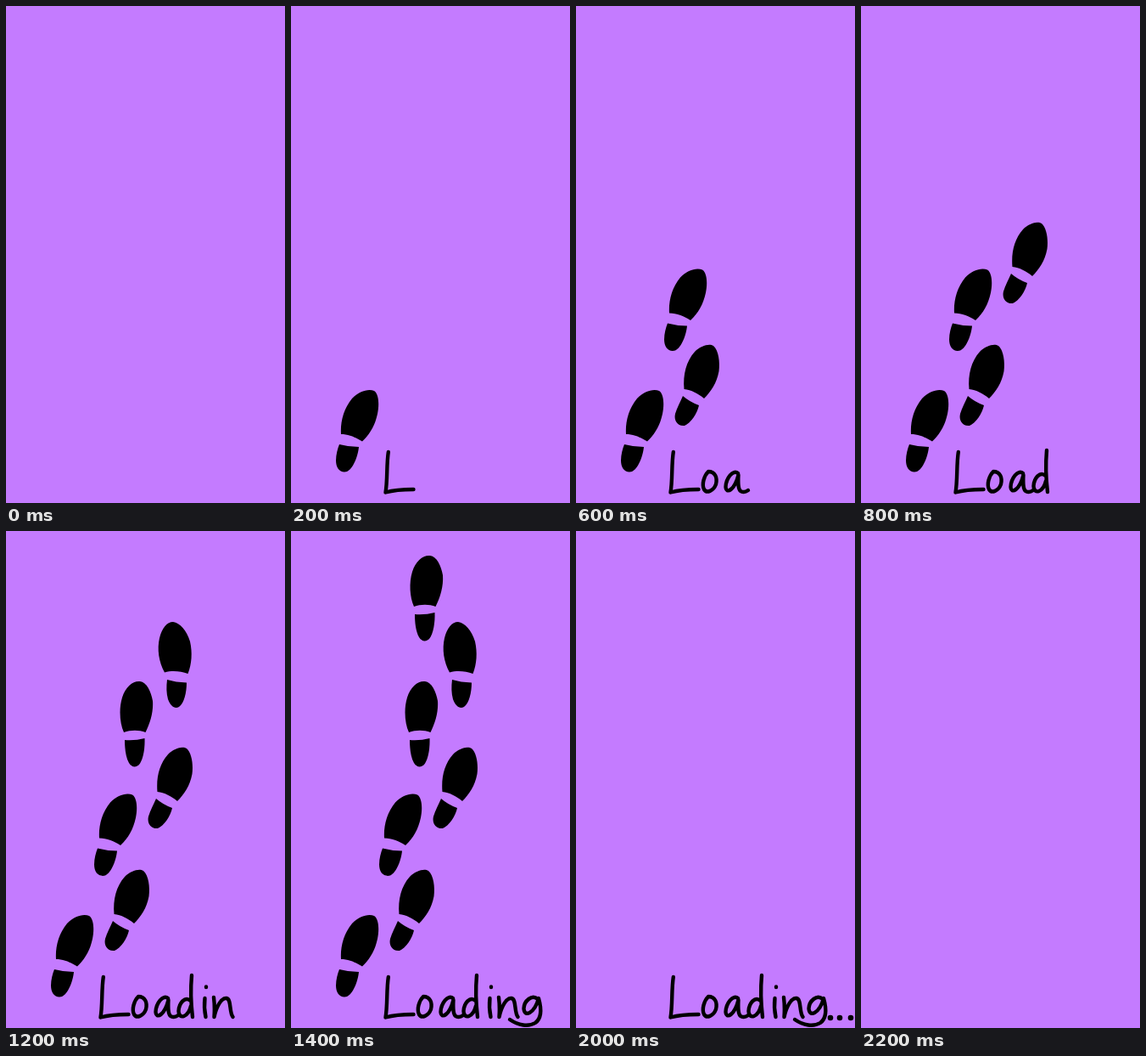
An HTML page that plays this animation: 329 px wide and 585 px high, repeating every 2.4 s.

```html
<!DOCTYPE html>
<html lang="en">
<head>
<meta charset="utf-8">
<title>Loading</title>
<style>
  html, body { margin: 0; width: 100%; height: 100%; overflow: hidden; background: #c47bff; }
  svg { display: block; width: 100vw; height: 100vh; }
  .ink { fill: none; stroke: #000; stroke-width: 4.4; stroke-linecap: round; stroke-linejoin: round; }
</style>
</head>
<body>
<svg viewBox="0 0 329 585" role="img" aria-label="Loading...">
  <defs>
    <path id="leftLean" d="M59 504C58 490 62 474 72 462C80 453 92 450 98 453C104 457 104 470 102 480C99 494 93 504 84 512.500C77 508 68 504 59 504Z
      M57 516Q68 519 80 519C79 530 73 545 66 548C58 550 53 544 53 535C53 528 55 521 57 516Z"/>
    <path id="rightLean" d="M127.500 451C126 434 130 418 140 407C147 400 157 397 162 400C168 405 170 419 168.500 430C166 444 159 454 151 462C144 456 136 452 127.500 451Z
      M126 459Q134 466 145 470C143 480 135 491 128 494C120 495 115 488 117 480C119 473 123 466 126 459Z"/>
    <path id="leftUp" d="M139 237C134 226 133 209 137 196C141 183 150 176 158 177C166 178 171 189 173 200C174 213 170 226 164.500 237C157 234 147 234 139 237Z
      M140 246Q152 247 163.500 244C164 255 162 269 157 275C153 279 148 278 145 273C141 266 140 255 140 246Z"/>
    <path id="rightUp" d="M187 166.500C180 154 178 139 181 126C184 114 190 107 197 107C205 108 213 117 217 130C220 143 219 157 214.500 168C206 165 196 164 187 166.500Z
      M190 175Q200 178 213 178.500C213 190 210 203 204 207C199 210 194 206 191 198C189 191 189 183 190 175Z"/>
  </defs>
  <g id="feet"></g>
  <g id="word"></g>
</svg>
<script>
const STEP = 200, LOOP = 2400, FEET_END = 2000, WORD_END = 2200;

// shape, x shift, y shift; one more print per step
const prints = [
  ['leftLean', 0, 0], ['rightLean', 0, 0],
  ['leftLean', 51, -142.5], ['rightLean', 51, -144],
  ['leftUp', 0, 0], ['rightUp', 0, 0],
  ['leftUp', 6, -148], ['rightUp', 4, -145]
];

// pen strokes, one letter per step
const letters = [
  'M114.800 525C112.500 540 114 558 111.500 572.500C122 569.500 134 569 144.500 569',
  'M156 548C151 553 148 563 151 569C154 574 162 571 165 563C167 555 164 548 156 548Z',
  'M191 550C185 545 177 556 176.500 566C177 575 187 570 191.500 552C191 562 191 570 195 571.500Q199 573 203 570',
  'M217.500 553C211 547 204 556 203.500 565C204 576 215 572 218 559M219 523C217.500 540 218.500 560 220 572',
  'M234.500 550C233.500 558 234 565 235.500 572M236 536.500v.5',
  'M245 549C246 557 246 565 245.500 572C248 560 254 549 260 550C266 551 263 566 267.500 572',
  'M291 551C284 545 275 553 274.500 562C275 573 287 568 292 550C296 564 295 574 288 579C280 584 268 582 258 575'
];
const dots = [300, 311, 324];

const make = (parent, tag, attrs) => {
  const el = document.createElementNS('http://www.w3.org/2000/svg', tag);
  for (const key in attrs) el.setAttribute(key, attrs[key]);
  return document.getElementById(parent).appendChild(el);
};

const parts = [];
const add = (el, step, end) => parts.push({ el, start: step * STEP, end });

prints.forEach(([shape, x, y], i) =>
  add(make('feet', 'use', { href: '#' + shape, x, y }), i + 1, FEET_END));
letters.forEach((d, i) =>
  add(make('word', 'path', { d, class: 'ink' }), i + 1, WORD_END));
dots.forEach((cx, i) =>
  add(make('word', 'circle', { cx, cy: 573, r: 3.3 }), letters.length + 1 + i, WORD_END));

const origin = performance.now();
function draw(now) {
  const t = Math.max(0, now - origin) % LOOP;
  for (const { el, start, end } of parts)
    el.style.visibility = t >= start && t < end ? 'visible' : 'hidden';
  requestAnimationFrame(draw);
}
draw(origin);
</script>
</body>
</html>
```
